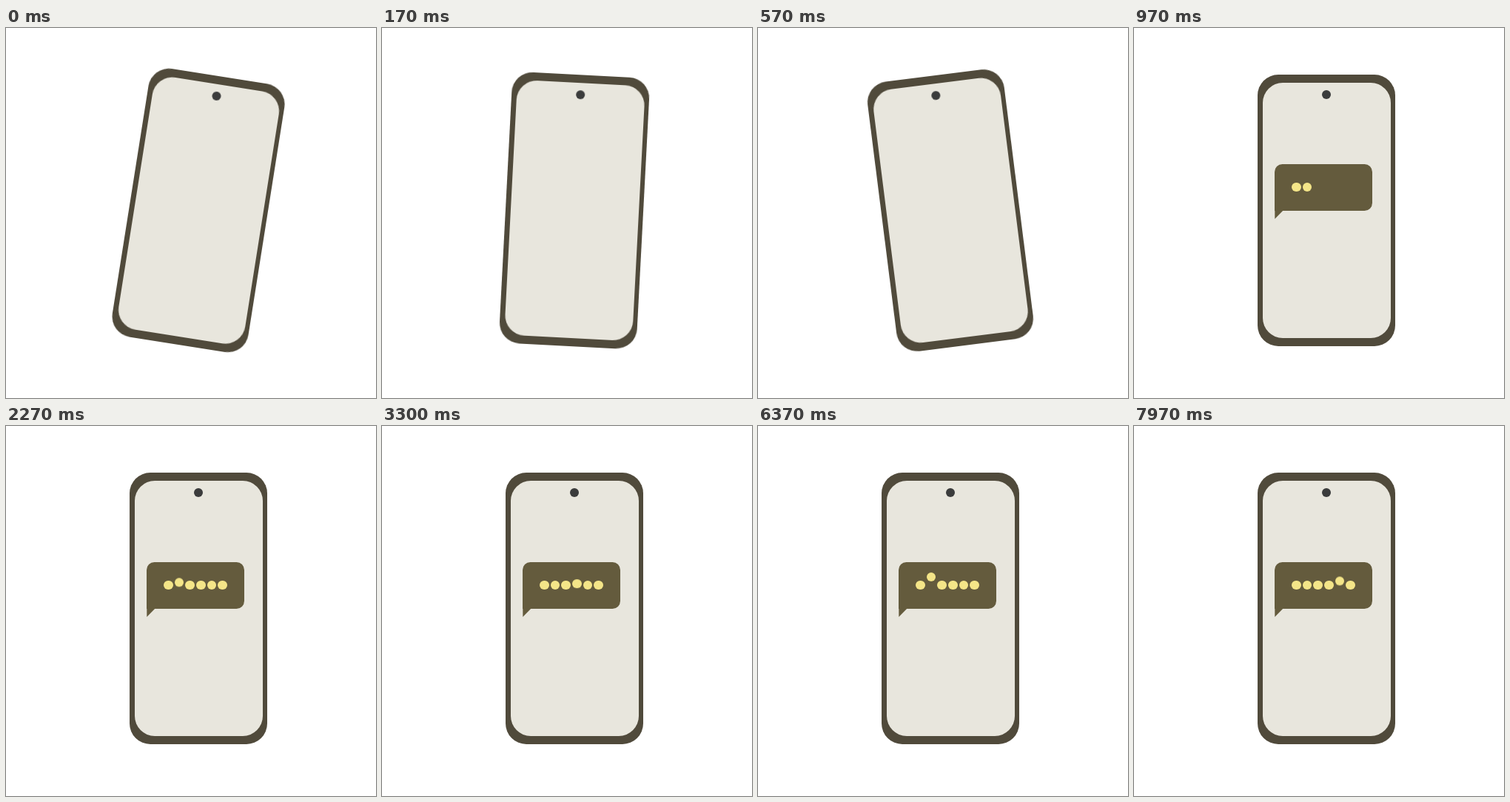
An HTML page that plays this animation: 500x500 px, repeating every 8 s.

```html
<!DOCTYPE html>
<html lang="en">
<head>
<meta charset="utf-8">
<title>Typing phone</title>
<style>
  html, body {
    margin: 0;
    width: 100%;
    height: 100%;
    overflow: hidden;
    background: #fff;
  }

  /* The loop runs 240 ticks at 30 per second; the small lead absorbs rounding. */
  :root {
    --loop: 8s;
    --lead: -0.004s;
  }

  div, i, b { position: absolute; display: block; }

  .phone {
    left: 167.2px;
    top: 63.4px;
    width: 185.6px;
    height: 367.4px;
    border-radius: 28px;
    background: #504a3b;
    animation: sway var(--loop) var(--lead) infinite;
  }

  .screen {
    left: 6.6px;
    top: 11.4px;
    width: 173.4px;
    height: 344.4px;
    border-radius: 27px;
    background: #e8e6dd;
  }

  .camera {
    left: 86.6px;
    top: 20.5px;
    width: 12.6px;
    height: 12.6px;
    border-radius: 50%;
    background: #3b3c3c;
  }

  .bubble {
    left: 190.3px;
    top: 184px;
    width: 131.9px;
    height: 62.7px;
    border-radius: 10.5px 10.5px 10.5px 0;
    background: #645b3d;
    animation: show var(--loop) var(--lead) step-end infinite;
  }

  .tail {
    left: 0;
    top: 62px;
    width: 12px;
    height: 12px;
    background: inherit;
    clip-path: polygon(0 0, 100% 0, 90% 8%, 0 100%);
  }

  .dots {
    left: 21.7px;
    top: 0;
    height: 60px;
    overflow: hidden;
    animation: type var(--loop) var(--lead) infinite;
  }

  /* Each dot hops twice per loop: the wrapper first, the dot itself later. */
  .dots i, .dots b {
    animation: hop var(--loop) calc(var(--start) * 1s / 30 - var(--loop) + var(--lead)) infinite;
  }

  .dots i {
    --start: calc(40 + 15 * var(--n));
    left: calc(0.9px + 14.7px * var(--n));
    top: 24.5px;
  }

  .dots i:first-child { --start: 37; }

  .dots b {
    --start: calc(167 + 15 * var(--n));
    width: 12.8px;
    height: 12.8px;
    border-radius: 50%;
    background: #f4e588;
  }

  @keyframes sway {
    0% { transform: rotate(9deg); animation-timing-function: steps(15); }
    6.25% { transform: rotate(-9deg); animation-timing-function: steps(10); }
    10.41667%, 100% { transform: rotate(0deg); }
  }

  @keyframes show {
    0% { visibility: hidden; }
    10.83333%, 100% { visibility: visible; }
  }

  @keyframes type {
    0% { width: 0; animation-timing-function: step-end; }
    11.25% { width: 14.7px; animation-timing-function: steps(5); }
    15.41667%, 100% { width: 88.2px; }
  }

  @keyframes hop {
    0% { transform: translateY(0); animation-timing-function: steps(7); }
    2.91667% { transform: translateY(-12.9px); }
    3.33333% { transform: translateY(-12.9px); animation-timing-function: steps(7); }
    6.25%, 100% { transform: translateY(0); }
  }
</style>
</head>
<body>
  <div class="phone">
    <div class="screen"></div>
    <div class="camera"></div>
  </div>
  <div class="bubble">
    <div class="tail"></div>
    <div class="dots">
      <i style="--n:0"><b></b></i>
      <i style="--n:1"><b></b></i>
      <i style="--n:2"><b></b></i>
      <i style="--n:3"><b></b></i>
      <i style="--n:4"><b></b></i>
      <i style="--n:5"><b></b></i>
    </div>
  </div>
</body>
</html>
```
